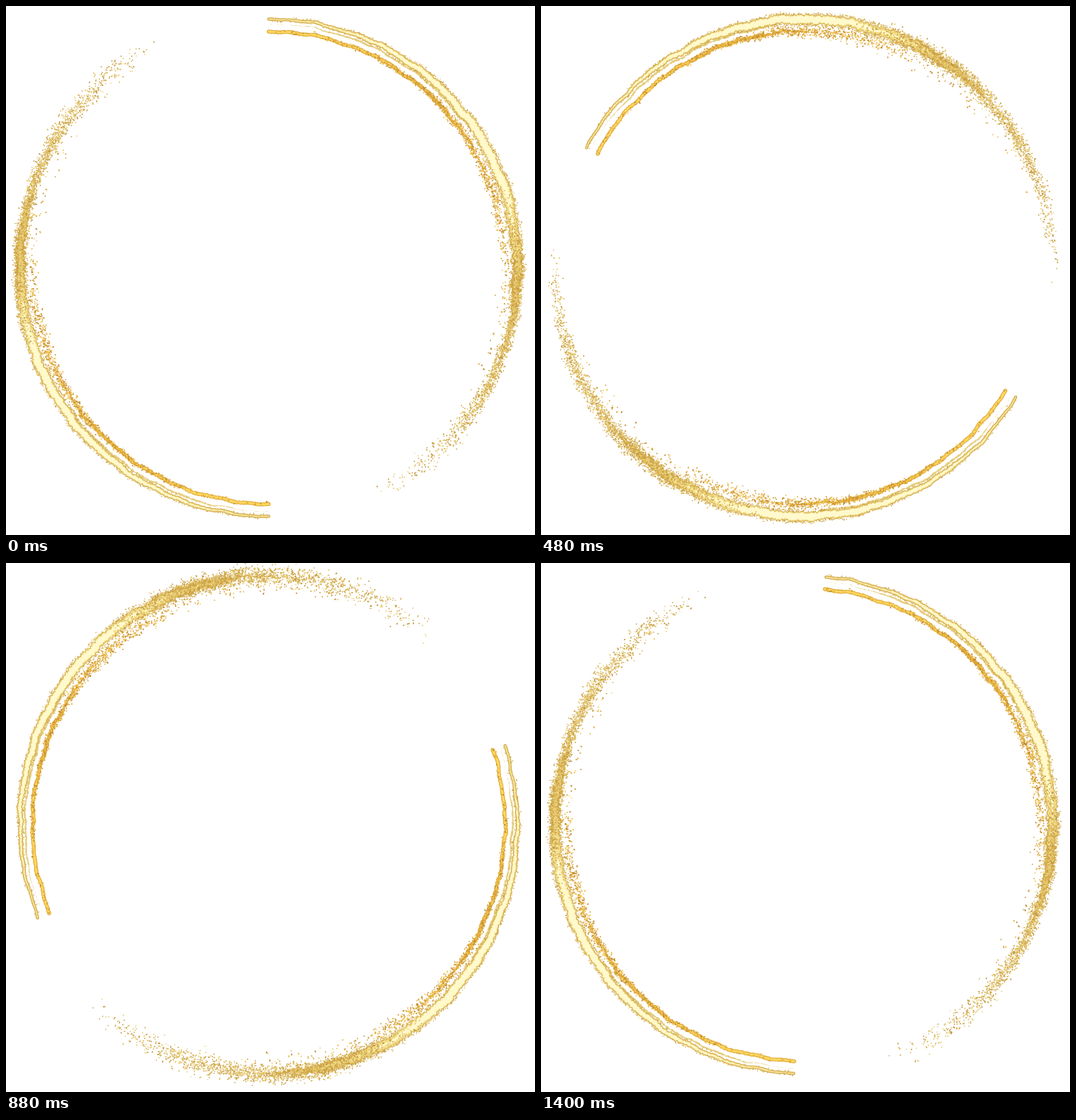
Write an HTML page with a canvas that moves like this. It is 748 px wide and 748 px high and loops after 1440 ms.

```html
<!DOCTYPE html>
<html lang="en">
<head>
<meta charset="utf-8">
<title>Golden ring</title>
<style>
html, body { margin: 0; width: 100%; height: 100%; overflow: hidden; background: #fff; }
canvas { display: block; width: 748px; height: 748px; }
</style>
</head>
<body>
<canvas id="stage" width="748" height="748"></canvas>
<script>
const ctx = document.getElementById('stage').getContext('2d');
const CX = 371.5, CY = 370, OUTER = 351.5, INNER = 334;
const STEP = 40, STEPS = 36, RAD = Math.PI / 180;
const TAN = ['#c2983f', '#d6ad4e', '#e8cd74'];
const AMBER = ['#c08a2c', '#dca43a', '#f0c24c'];

let seed = 7321;
function rnd() {
  seed = seed + 0x6D2B79F5 | 0;
  let t = Math.imul(seed ^ seed >>> 15, 1 | seed);
  t = t + Math.imul(t ^ t >>> 7, 61 | t) ^ t;
  return ((t ^ t >>> 14) >>> 0) / 4294967296;
}
const gauss = () => (rnd() + rnd() + rnd() + rnd() - 2) * 1.73;
const mod = (v, m) => ((v % m) + m) % m;

// eased 0..1 as u goes from a to b
function ease(a, b, u) {
  const k = Math.min(1, Math.max(0, (u - a) / (b - a)));
  return k * k * (3 - 2 * k);
}
const px = (a, r) => CX + r * Math.cos(a * RAD);
const py = (a, r) => CY - r * Math.sin(a * RAD);

// The texture is fixed on the stage; u is the angle behind an arm's head.
const SLOTS = 1440, SLOT = 360 / SLOTS;
const edges = Array.from({ length: 2 * SLOTS }, () => rnd() - 0.5);
const wobble = (a, phase) => 0.7 * Math.sin(23 * a * RAD + phase)
  + 0.6 * Math.sin(41 * a * RAD + 2 * phase) + 0.45 * Math.sin(67 * a * RAD + 3);
const rough = u => 0.7 + 0.04 * u;
const half = u => 2.2 + 4.8 * ease(0, 65, u);
const spread = a => 3 + 4 * Math.abs(Math.sin(a * RAD));

const bands = [
  { r: INNER, phase: 1.5, color: '#dfaa3c', end: 85, half: u => 2.7 - 4.5 * ease(40, 85, u) },
  { r: INNER, phase: 1.5, color: '#ffd95e', end: 65, half: u => 1.5 - 3 * ease(20, 65, u) },
  { r: OUTER - 7, phase: 0.4, color: '#e6cd7c', end: 55, half: u => 1.3 * ease(4, 20, u) },
  { r: OUTER, phase: 0.8, color: '#d2aa4e', end: 118, half: u => half(u) - 10 * ease(92, 118, u) },
  { r: OUTER, phase: 0.8, color: '#f2dd88', end: 114, half: u => half(u) - 1.2 - 9 * ease(78, 114, u) },
  { r: OUTER, phase: 0.8, color: '#fff9cc', end: 102, half: u => half(u) - 2.3 - 8 * ease(65, 102, u) }
];

const lanes = [
  { n: 6500, colors: AMBER, r: INNER, size: 1.7,
    density: u => 0.9 * ease(5, 55, u) * (1 - ease(62, 98, u)) + 0.08 * (1 - ease(100, 135, u)),
    offset: (g, u) => g.g * (1.6 + spread(g.a) * 0.65 * ease(25, 95, u)) },
  { n: 15000, colors: TAN, r: OUTER + 1, size: 1.6,
    density: u => ease(68, 104, u) * (1 - ease(100, 157, u)),
    offset: (g, u) => g.g * spread(g.a) * (0.9 + 0.4 * ease(110, 150, u)) },
  { n: 5000, colors: TAN, r: OUTER, size: 1.2,
    density: u => (0.1 + 0.7 * ease(0, 80, u)) * (1 - ease(88, 112, u)),
    offset: (g, u) => Math.sign(g.g) * (half(u) + Math.abs(g.g) * (0.9 + 1.2 * ease(30, 90, u))) }
];
for (const lane of lanes) {
  lane.grains = Array.from({ length: lane.n }, () => ({
    a: rnd() * 360, g: gauss(), keep: rnd(), hue: Math.floor(rnd() * 3),
    len: 1.1 + 2.4 * rnd() * rnd(), tilt: 0.5 + gauss() * 0.6
  }));
}

function drawBand(band, head) {
  const top = [], bottom = [];
  const add = a => {
    const u = head - a, i = mod(Math.round(a / SLOT), SLOTS);
    const h = band.half(u), r = band.r + wobble(a, band.phase);
    const hi = r + Math.max(0, h + edges[i] * rough(u));
    const lo = r - Math.max(0, h + edges[i + SLOTS] * rough(u));
    top.push([px(a, hi), py(a, hi)]);
    bottom.push([px(a, lo), py(a, lo)]);
  };
  add(head);
  for (let i = Math.floor(head / SLOT); i * SLOT > head - band.end; i--) add(i * SLOT);
  ctx.fillStyle = band.color;
  ctx.beginPath();
  for (const [x, y] of top.concat(bottom.reverse())) ctx.lineTo(x, y);
  ctx.fill();

  const r = band.r + wobble(head, band.phase);
  ctx.beginPath();
  ctx.arc(px(head, r), py(head, r), Math.max(0, band.half(0)), 0, 7);
  ctx.fill();
}

function drawGrains(lane, head) {
  const paths = lane.colors.map(() => new Path2D());
  for (const g of lane.grains) {
    const u = mod(head - g.a, 360);
    if (u > 160 || g.keep > lane.density(u)) continue;
    const r = lane.r + wobble(g.a, 0.8) + lane.offset(g, u);
    const x = px(g.a, r), y = py(g.a, r);
    const dir = g.a * RAD - g.tilt;
    const dx = Math.cos(dir) * g.len / 2, dy = -Math.sin(dir) * g.len / 2;
    paths[g.hue].moveTo(x - dx, y - dy);
    paths[g.hue].lineTo(x + dx, y + dy);
  }
  ctx.lineWidth = lane.size;
  paths.forEach((path, i) => {
    ctx.strokeStyle = lane.colors[i];
    ctx.stroke(path);
  });
}

function draw(n) {
  ctx.clearRect(0, 0, 748, 748);
  const heads = [
    90 + 5 * n + Math.min(2.7, 0.09 * n),
    270 + 5 * n - 1.6 * Math.sin(Math.PI * n / STEPS)
  ];
  for (const head of heads) {
    for (const band of bands) drawBand(band, head);
    for (const lane of lanes) drawGrains(lane, head);
  }
}

const start = performance.now();
let shown = -1;
function tick() {
  const n = Math.floor((performance.now() - start) / STEP) % STEPS;
  if (n !== shown) draw(shown = n);
  requestAnimationFrame(tick);
}
tick();
</script>
</body>
</html>
```
